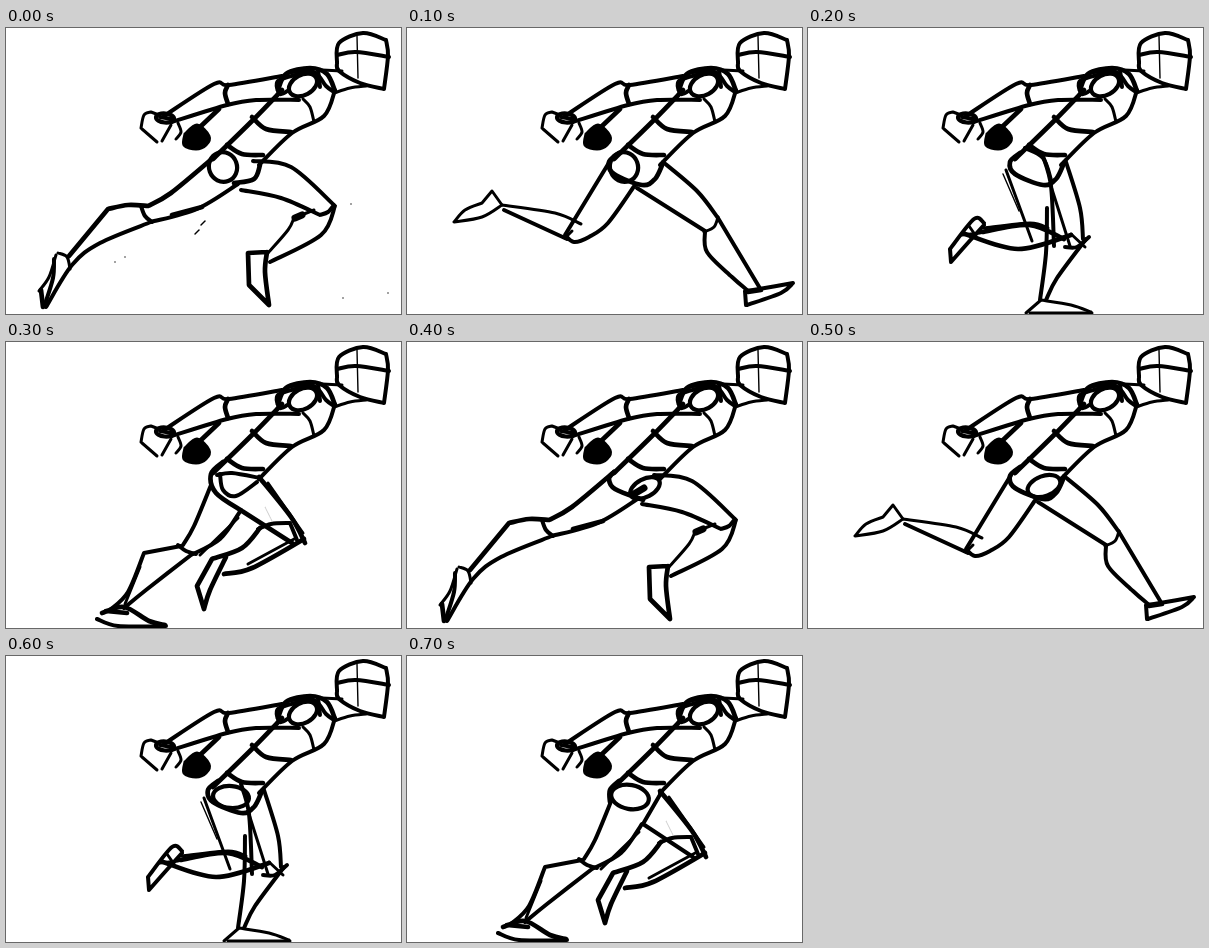
An HTML page that plays this animation: 395x286 px, repeating every 800 ms.

```html
<!DOCTYPE html>
<html lang="en">
<head>
<meta charset="utf-8">
<title>Run cycle</title>
<style>
html, body { margin: 0; width: 100%; height: 100%; overflow: hidden; background: #fff; }
svg { display: block; width: 395px; height: 286px; }
path { fill: none; stroke: #000; stroke-linecap: round; stroke-linejoin: round; }
</style>
</head>
<body>
<svg id="stage" viewBox="0 0 395 286"></svg>
<script>
const FRAME = 100, COUNT = 8;
const NS = 'http://www.w3.org/2000/svg';
const stage = document.getElementById('stage');

// Pen widths; "s" is a filled shape, "o" an oval (centre, radii, tilt), "g" a faint line
const pens = { d: 1.4, g: 1, t: 3, s: 3, m: 4, o: 4.2, b: 4.7, h: 7 };

// A slash marks a sharp corner between two smooth runs of points
const head = [
  'm 331 35 333 15 357 5 380 12 / 382 28 378 61 / 354 55 333 43 331 35',
  'm 331 27 350 24 383 29',
  'd 351 8 352 50',
  't 316 42 336 43',
  't 328 65 344 60 360 58'
];
const torso = [
  'b 272 62 280 46 304 40 321 46 329 63',
  'm 284 44 308 44 320 58 328 64',
  'o 297 57 15 10 -28',
  'm 283 62 274 66 272 53 293 46',
  'm 312 42 314 59',
  'm 329 62 318 88 286 105 253 137',
  't 297 71 304 79 308 94',
  'b 276 62 246 93 207 131',
  'b 246 89 260 101 285 104',
  'b 221 117 236 126 257 127'
];
const arms = [
  'm 276 48 223 57 208 56 158 88',
  'm 293 72 250 72 221 77 166 94',
  'b 222 57 219 65 222 76',
  'o 159 90 9 4.5 5',
  'm 154 89 166 91',
  't 153 87 145 84 / 138 87 135 100',
  't 136 101 151 114',
  't 165 97 156 113',
  't 172 95 175 104 170 111',
  'b 213 81 194 99',
  's 179 106 191 97 203 108 200 117 190 121 178 117 179 106'
];

const pushLeg = [
  'b 207 130 165 165 142 178 / 122 177 102 181 / 63 228',
  'm 232 156 191 181 145 194 / 94 215 66 237 40 279',
  'm 135 178 139 188 146 194',
  'b 166 187 196 179',
  't 50 227 43 249 33 263',
  'b 35 262 37 279',
  't 52 225 61 229 64 241',
  'm 48 231 47 250 39 276'
];
const kneeLeg = [
  'm 247 133 285 139 328 177 / 322 184 314 187 / 275 170 235 162',
  'm 329 178 315 207 264 234',
  't 308 182 288 190 / 282 202 262 225',
  'h 296 187 289 190',
  'b 261 224 242 225 / 243 257 / 263 277 / 259 244 261 224'
];
const trailLeg = [
  'm 203 133 172 184 158 207 / 167 214 182 209 201 195 228 157',
  't 158 210 165 203',
  't 95 177 148 185 174 196',
  'm 97 182 160 211',
  't 95 177 85 163 / 75 175 / 58 182 47 194 / 75 189 95 177'
];
const landLeg = [
  'm 256 134 290 163 311 190 / 354 262',
  'm 230 160 298 203 / 300 224 325 249 340 262',
  't 297 204 307 199 311 189',
  'm 339 277 338 263 / 352 261 386 255 / 374 265 340 277',
  'b 341 264 354 262'
];
const standLeg = [
  'm 258 134 272 180 275 211',
  'm 235 128 243 158 246 218',
  't 242 155 262 218',
  't 198 142 224 213',
  'd 195 146 211 183',
  'm 278 211 249 250 238 272',
  'm 239 180 238 225 232 272',
  'm 257 219 269 219 281 209',
  't 263 206 277 219',
  't 218 285 233 272 / 263 277 283 284',
  't 222 285 284 285'
];
const swingLeg = [
  'b 174 204 221 197 256 211',
  't 176 200 222 195 240 200',
  'b 157 206 210 221 263 207',
  'm 176 195 166 191 142 221 / 143 234 / 158 217 176 197',
  't 154 207 172 205',
  't 161 198 168 208'
];
const driveLeg = [
  'm 205 143 188 184 177 203',
  'm 235 168 214 197 185 213 / 140 248 118 266',
  't 232 176 194 213',
  'm 172 203 180 209 190 212',
  'm 175 204 138 211 / 122 250 104 268',
  't 134 225 119 262',
  'b 96 271 118 265 143 279 159 283',
  'm 91 277 112 284 160 284',
  'b 100 269 121 271'
];
const liftLeg = [
  'b 253 135 285 175 299 201',
  't 262 141 297 191',
  'm 252 187 265 182 284 181 / 291 198',
  'b 254 186 236 206 206 217 / 191 244 / 198 267 / 204 248 220 215',
  'b 298 197 246 226 218 232',
  't 290 196 242 222',
  'g 259 165 266 179'
];

const pelvis = ['b 212 125 202 134 207 146 235 157 248 151 256 135'];
const ring = ['o 217 139 14 15 -20'];
const specks = ['d 189 206 193 202', 'd 195 197 199 193', 'd 109 234', 'd 119 229', 'd 345 176', 'd 337 270', 'd 382 265'];
const openHip = [
  'b 217 120 205 132 210 151 236 169 / 286 201',
  'm 214 132 217 148 230 154 251 140',
  'm 211 133 226 131 254 136'
];
const closedHip = [
  'b 212 125 203 134 203 146',
  'o 223 141 19 12 10',
  'm 286 201 236 168 / 254 137'
];

const poses = [
  [pushLeg, kneeLeg, ring, ['b 228 155 248 151 254 137'], specks],
  [trailLeg, landLeg, pelvis, ring],
  [standLeg, swingLeg, pelvis, ['m 217 120 235 130 243 152']],
  [driveLeg, liftLeg, openHip],
  [pushLeg, kneeLeg, ['b 207 130 202 137 208 147 236 158', 'o 238 146 16 9 -28', 'h 227 152 237 146']],
  [trailLeg, landLeg, pelvis, ['o 236 144 17 10 -20']],
  [standLeg, swingLeg, pelvis, ['o 225 141 18 11 5']],
  [driveLeg, liftLeg, closedHip]
];

// Catmull-Rom curve through the points
function curve(p) {
  const at = i => p[Math.max(0, Math.min(p.length - 1, i))];
  let d = '';
  for (let i = 0; i < p.length - 1; i++) {
    const [a, b, c, e] = [at(i - 1), at(i), at(i + 1), at(i + 2)];
    const c1 = b.map((v, k) => v + (c[k] - a[k]) / 6);
    const c2 = c.map((v, k) => v - (e[k] - b[k]) / 6);
    d += `C${c1} ${c2} ${c}`;
  }
  return d;
}

function outline(text) {
  let last, d = '';
  for (const run of text.split('/')) {
    const v = run.trim().split(' ').map(Number);
    const p = last ? [last] : [];
    for (let i = 0; i < v.length; i += 2) p.push([v[i], v[i + 1]]);
    if (!last) d = `M${p[0]}h0`;
    d += curve(p);
    last = p[p.length - 1];
  }
  return d;
}

function oval(text) {
  const [x, y, rx, ry, tilt] = text.split(' ').map(Number);
  const a = tilt * Math.PI / 180, dx = rx * Math.cos(a), dy = rx * Math.sin(a);
  const arc = `A${rx} ${ry} ${tilt} 0 1 `;
  return `M${x - dx} ${y - dy}${arc}${x + dx} ${y + dy}${arc}${x - dx} ${y - dy}z`;
}

function draw(strokes, parent) {
  for (const stroke of strokes) {
    const pen = stroke[0], text = stroke.slice(2);
    const path = document.createElementNS(NS, 'path');
    path.setAttribute('d', pen === 'o' ? oval(text) : outline(text));
    path.style.strokeWidth = pens[pen];
    if (pen === 's') path.style.fill = '#000';
    if (pen === 'g') path.style.stroke = '#ccc';
    parent.append(path);
  }
}

poses.forEach((parts, step) => {
  const g = document.createElementNS(NS, 'g');
  draw(parts.flat(), g);
  stage.append(g);
  const keys = Array.from({ length: COUNT + 1 }, (_, i) => ({
    offset: i / COUNT,
    opacity: i % COUNT === step ? 1 : 0,
    easing: 'step-end'
  }));
  g.animate(keys, { duration: FRAME * COUNT, iterations: Infinity });
});
draw([...head, ...torso, ...arms], stage);
</script>
</body>
</html>
```
